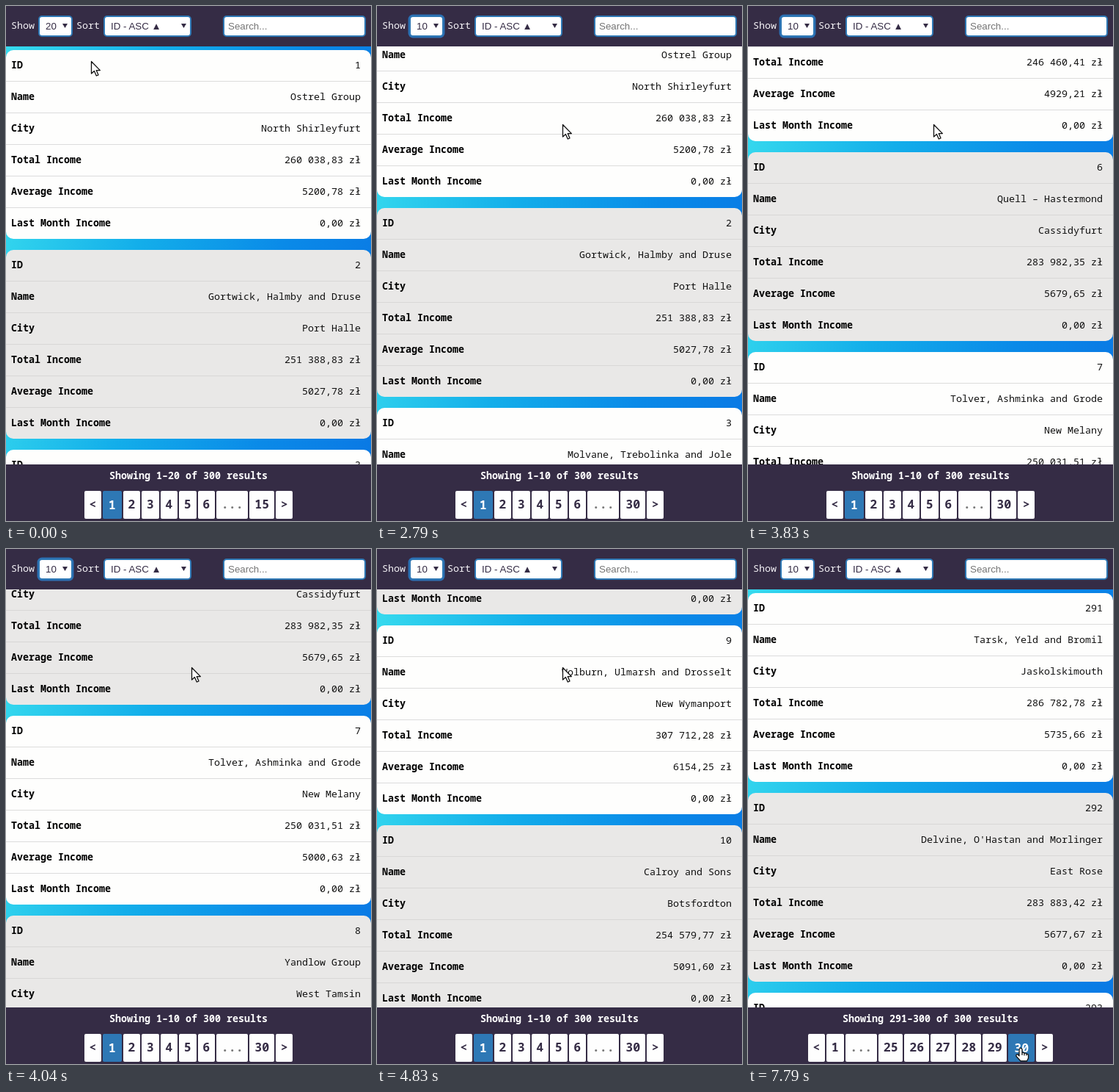
Write an HTML page that moves like this. It is 498x701 px and loops after 8000 ms.

```html
<!DOCTYPE html>
<html lang="en">
<head>
<meta charset="utf-8">
<title>Client list</title>
<style>
  :root { --dark: #352c45; --blue: #2e78b5; }
  * { box-sizing: border-box; }
  html, body { margin: 0; width: 100%; height: 100%; overflow: hidden; }
  #stage {
    position: relative; width: 498px; height: 701px; overflow: hidden;
    background: linear-gradient(97deg, #38dcee, #13aeea 38%, #0a8ae8 72%, #0a78e4);
    font: 13.333px "Noto Sans Mono", monospace; color: #111;
  }
  #stage > * { position: absolute; }
  #list { left: 0; top: 60px; width: 498px; }
  .card { height: 257px; margin-bottom: 15px; border-radius: 10px; background: #fefefd; overflow: hidden; }
  .card.even { background: #e9e8e7; }
  .row {
    display: flex; justify-content: space-between; height: 43px; padding: 0 14px 0 7px;
    line-height: 41px; border-bottom: 1px solid #dcdcdc; white-space: pre;
  }
  .even .row { border-color: #d8d7d6; }
  .row:last-child { border: 0; }
  .row b { color: #000; }
  header { left: 0; top: 0; width: 498px; height: 55px; background: var(--dark); color: #f4f2f6; }
  header > * { position: absolute; }
  header > span { top: 13px; line-height: 27px; }
  .field {
    top: 13px; height: 29px; padding-left: 8px; border: 2px solid var(--blue); border-radius: 5px;
    background: #fff; color: var(--dark); line-height: 25px; white-space: pre;
  }
  .field, #menu { font-family: "Liberation Sans", "DejaVu Sans", sans-serif; }
  .pick::after {
    content: ""; position: absolute; right: 5px; top: 9px; width: 7px; height: 6px;
    background: var(--dark); clip-path: polygon(0 0, 100% 0, 50% 100%);
  }
  .focus { box-shadow: 0 0 0 1.5px #2b6cb0; }
  #menu { left: 45px; top: 41px; width: 46px; height: 72px; background: #fff; color: var(--dark); }
  #menu div { height: 18px; padding-left: 9px; line-height: 18px; }
  #menu .on { background: var(--blue); color: #fff; }
  footer { left: 0; top: 624px; width: 498px; height: 77px; background: var(--dark); color: #fff; text-align: center; }
  #info { height: 36px; line-height: 31px; font-weight: 700; }
  #pager { display: flex; justify-content: center; gap: 2px; }
  #pager span {
    height: 38px; padding: 0 6.75px; border-radius: 2px; background: #fefefe; color: var(--dark);
    font-size: 16.667px; font-weight: 700; line-height: 36px;
  }
  #pager .gap { color: #777; }
  #pager .on { padding: 0 7.75px; background: var(--blue); color: #fff; line-height: 38px; }
  #cursor { left: 0; top: 0; width: 1px; height: 1px; overflow: visible; fill: #fff; stroke: #111; stroke-width: 1.3; stroke-linejoin: round; }
</style>
</head>
<body>
<div id="stage">
  <div id="list"></div>
  <header>
    <span style="left:7px">Show</span>
    <div class="field pick" id="size" style="left:44px;width:47px"></div>
    <span style="left:96px">Sort</span>
    <div class="field pick" style="left:133px;width:120px">ID - ASC ▲</div>
    <div class="field" style="left:296px;width:195px;padding-left:5px;color:#757575">Search...</div>
  </header>
  <footer><div id="info"></div><div id="pager"></div></footer>
  <div id="menu"><div>10</div><div>20</div><div>50</div><div>100</div></div>
  <svg id="cursor">
    <path id="arrow" d="M.5.5V17L4.4 13.5 7.3 20 10 18.8 7.2 12.6H12.4Z"/>
    <path id="hand" d="M-2 1.8Q0-1 2 1.8V7Q4 5.5 5 7.5 7 6.5 8 8.5 10 8 10.5 10V14L8.5 18H0L-6 11.5Q-6.5 8.5-4 9L-2 11ZM2 7v3M5 7.5v3M8 8.5v2"/>
  </svg>
</div>
<script>
const LOOP = 8000, TOTAL = 300;
const $ = id => document.getElementById(id);

// id: name, city, total income
const clients = {
  1: ["Ostrel Group", "North Shirleyfurt", 260038.83],
  2: ["Gortwick, Halmby and Druse", "Port Halle", 251388.83],
  3: ["Molvane, Trebolinka and Jole", "Lake Orvin", 262417.05],
  4: ["Baldrin Group", "Rennerfort", 255421.47],
  5: ["Vosk, Brandelow and Fennimoor", "East Dawn", 246460.41],
  6: ["Quell – Hastermond", "Cassidyfurt", 283982.35],
  7: ["Tolver, Ashminka and Grode", "New Melany", 250031.51],
  8: ["Yandlow Group", "West Tamsin", 258988.97],
  9: ["Wolburn, Ulmarsh and Drosselt", "New Wymanport", 307712.28],
  10: ["Calroy and Sons", "Botsfordton", 254579.77],
  31: ["Umber – Ulmarsh", "North Jayde", 270483.88],
  32: ["Vintho Inc", "South Aniyahtown", 275625.14],
  33: ["Pelmast Inc", "Port Elwin", 261904.2],
  41: ["Norvask and Sons", "East Calden", 268215.46],
  42: ["Hulmer, Brint and Sorley", "Lake Merrin", 254870.19],
  43: ["Jastrel Group", "New Orla", 249316.7],
  291: ["Tarsk, Yeld and Bromil", "Jaskolskimouth", 286782.78],
  292: ["Delvine, O'Hastan and Morlinger", "East Rose", 283883.42],
  293: ["Grindle Inc", "Port Nella", 271508.3],
};

const views = [
  { at: 0, size: 20, page: 1 },
  { at: 1880, size: 10, page: 1 },
  { at: 6080, size: 10, page: 4 },
  { at: 6920, size: 10, page: 5 },
  { at: 7790, size: 10, page: 30 },
];

// wheel bursts: start, step length, scroll offset at each step
const bursts = [
  [2710, 40, [10, 28, 57, 130, 230, 310, 350]],
  [3130, 40, [400, 500, 600, 690, 760, 790]],
  [3500, 55, [800, 845, 910, 990, 1070, 1150, 1221, 1290, 1370, 1465, 1570, 1690, 1810, 1930, 2005]],
  [4330, 72, [2038, 2066, 2088, 2104, 2116, 2125, 2132, 2137, 2141, 2144, 2145, 2146]],
];
const scrollEnd = 6080;

// pointer stops: time, x, y
const moves = [
  [0, 116, 75], [80, 106, 61], [170, 98, 52],
  [540, 93, 49], [640, 84, 43], [740, 75, 38], [840, 72, 35],
  [1250, 68, 48], [1320, 66, 64], [1390, 65, 60], [1460, 65, 47],
  [2130, 110, 72], [2240, 205, 128], [2350, 274, 162], [2460, 253, 161],
  [5210, 253, 190], [5320, 262, 270], [5430, 268, 380], [5540, 262, 490],
  [5650, 248, 590], [5760, 236, 645], [5860, 229, 668], [5960, 227, 674],
  [6500, 233, 673], [6600, 241, 672], [6710, 245, 675],
  [7010, 262, 676], [7100, 290, 680], [7190, 325, 682], [7280, 350, 681],
  [7370, 364, 680], [7460, 370, 679], [7540, 372, 679],
];

const money = n => n.toFixed(2).replace(".", ",") + " zł";
const grouped = n => money(n).replace(/(\d)(?=\d{3},)/, "$1 ");
const range = (from, to) => Array.from({ length: to - from + 1 }, (_, i) => from + i);
const within = (t, from, to) => t >= from && t < to;

function card(id) {
  const [name, city, total] = clients[id];
  const rows = {
    "ID": id, "Name": name, "City": city, "Total Income": grouped(total),
    "Average Income": money(total / 50), "Last Month Income": money(0),
  };
  const body = Object.entries(rows).map(([k, v]) => `<div class="row"><b>${k}</b><span>${v}</span></div>`);
  return `<div class="card ${id % 2 ? "" : "even"}">${body.join("")}</div>`;
}

function pageItems(page, last) {
  if (page < 5) return [...range(1, 6), "...", last];
  if (page > last - 4) return [1, "...", ...range(last - 5, last)];
  return [1, "...", ...range(page - 2, page + 2), "...", last];
}

let shown;
function showView(view) {
  if (view === shown) return;
  shown = view;
  const { size, page } = view;
  const first = (page - 1) * size + 1, end = page * size;
  $("list").innerHTML = range(first, end).filter(id => clients[id]).map(card).join("");
  $("size").textContent = size;
  $("info").textContent = `Showing ${first}–${end} of ${TOTAL} results`;
  $("pager").innerHTML = ["&lt;", ...pageItems(page, TOTAL / size), "&gt;"].map(item => {
    const cls = item === page ? "on" : item === "..." ? "gap" : "";
    return `<span class="${cls}">${item}</span>`;
  }).join("");
}

function scrollAt(t) {
  const burst = bursts.findLast(b => t >= b[0]);
  if (!burst || t >= scrollEnd) return 0;
  const [start, step, stops] = burst;
  return stops[Math.min(stops.length - 1, Math.floor((t - start) / step))];
}

function draw(t) {
  showView(views.findLast(v => t >= v.at));
  $("list").style.transform = `translateY(${-scrollAt(t)}px)`;

  $("size").classList.toggle("focus", within(t, 940, 5960));
  $("menu").style.display = within(t, 1040, 1880) ? "" : "none";
  const hovered = t < 1460 ? 1 : 0;
  [...$("menu").children].forEach((el, i) => el.classList.toggle("on", i === hovered));

  const [, x, y] = moves.findLast(m => t >= m[0]);
  const overPager = y >= 660;
  $("cursor").style.transform = `translate(${x}px, ${y}px)`;
  $("arrow").style.display = overPager ? "none" : "";
  $("hand").style.display = overPager ? "" : "none";
}

const begin = performance.now();
function tick() {
  draw((performance.now() - begin) % LOOP);
  requestAnimationFrame(tick);
}
tick();
</script>
</body>
</html>
```
